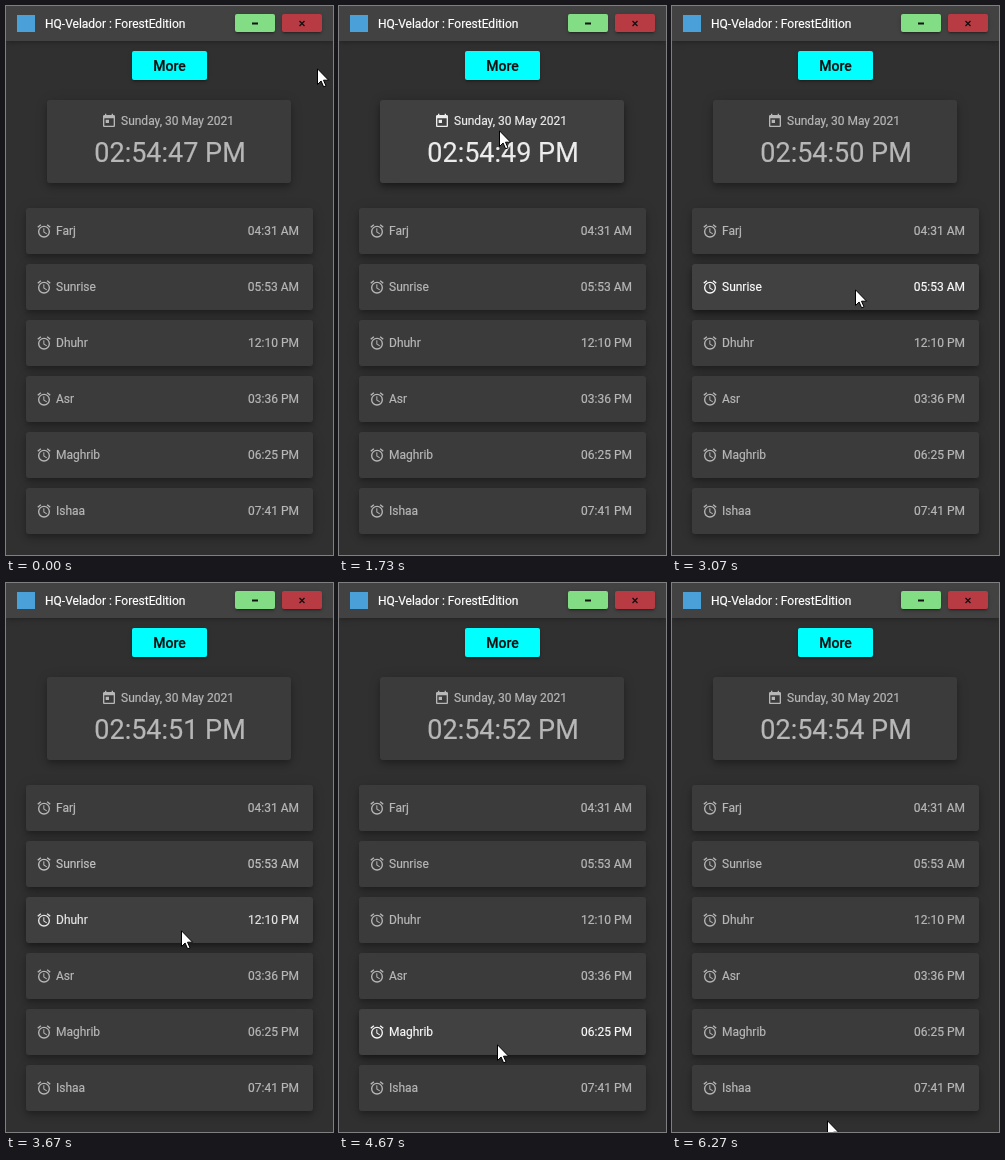
An HTML page for the animation above (6470 ms loop, 327x549 px).

```html
<!DOCTYPE html>
<html lang="en">
<head>
<meta charset="utf-8">
<title>Daily times</title>
<style>
html, body { margin: 0; width: 100%; height: 100%; overflow: hidden; background: #303030; }
body {
  position: relative; color: #fff; font: 12px Roboto, sans-serif; cursor: default;
  -webkit-text-stroke: .2px;
}
body *, svg { position: absolute; box-sizing: border-box; white-space: nowrap; }
header, .card {
  background: #424242;
  box-shadow: 0 3px 5px -1px rgba(0,0,0,.3), 0 5px 8px rgba(0,0,0,.24), 0 1px 14px rgba(0,0,0,.2);
}
header {
  left: 0; top: 0; width: 327px; height: 35px; line-height: 37px;
  box-shadow: 0 2px 4px -1px rgba(0,0,0,.2), 0 1px 8px rgba(0,0,0,.14);
}
header b, .more {
  border-radius: 2px;
  box-shadow: 0 3px 1px -2px rgba(0,0,0,.2), 0 2px 2px rgba(0,0,0,.14), 0 1px 5px rgba(0,0,0,.12);
}
header b { top: 8px; width: 40px; height: 18px; }
header svg { left: 0; top: 0; }
.logo { left: 11px; top: 9px; width: 18px; height: 17px; background: #4aa0d8; }
.more {
  left: 126px; top: 45px; width: 75px; height: 29px;
  background: #0ff; color: #111; font-size: 14px; font-weight: 500; line-height: 30px; text-align: center;
}
.card { border-radius: 3px; opacity: .65; }
.clock { left: 41px; top: 94px; width: 244px; height: 83px; }
.date { left: 74px; top: 11px; line-height: 20px; }
.time { left: 1px; top: 38px; width: 244px; font-size: 27px; line-height: 30px; text-align: center; }
.row { left: 20px; width: 287px; height: 46px; line-height: 46px; }
.name { left: 30px; }
.hour { right: 14px; }
.icon { width: 16px; height: 16px; fill: #fff; }
.row .icon { left: 10px; top: 15px; }
.clock .icon { left: 54px; top: 13px; }
#pointer { left: 0; top: 0; width: 14px; height: 21px; }
</style>
</head>
<body>
<header>
  <i class="logo"></i>
  <span style="left:39px">HQ-Velador : ForestEdition</span>
  <b style="left:229px;background:#82dd85"></b>
  <b style="left:276px;background:#b83a43"></b>
  <svg width="327" height="35" fill="none" stroke="#111">
    <path d="M246 17.5h6" stroke-width="2"/>
    <path d="M293.5 15l5 5m0-5l-5 5" stroke-width="1.3"/>
  </svg>
</header>
<div class="more">More</div>
<div class="card clock">
  <svg class="icon" viewBox="0 0 24 24"><path d="M19 3h-1V1h-2v2H8V1H6v2H5c-1.1 0-2 .9-2 2v14c0 1.1.9 2 2 2h14c1.1 0 2-.9 2-2V5c0-1.1-.9-2-2-2zm0 16H5V8h14zM7 10h5v5H7z"/></svg>
  <span class="date">Sunday, 30 May 2021</span>
  <span class="time"></span>
</div>
<svg id="pointer"><path d="M.5.8V16.5L4.1 13 6.6 18.8 9 17.8 6.5 12.2H11.6Z" fill="#fff" stroke="#000"/></svg>
<script>
const LOOP = 6470, FADE = 500, DIM = .65;
const ROWS = {
  Farj: '04:31 AM', Sunrise: '05:53 AM', Dhuhr: '12:10 PM',
  Asr: '03:36 PM', Maghrib: '06:25 PM', Ishaa: '07:41 PM'
};

// Key points of the pointer: time, x, y
const PATH = [
  [0, 311, 62], [330, 279, 57], [730, 279, 57], [1070, 158, 72], [1330, 158, 72],
  [1730, 160, 124], [1930, 172, 180], [2200, 177, 222], [2600, 181, 235], [2800, 183, 272],
  [3070, 183, 283], [3270, 183, 283], [3900, 170, 384], [4200, 162, 408], [5130, 155, 512],
  [5470, 155, 537], [LOOP, 155, 537]
];

const ALARM = 'M22 5.7l-4.6-3.8-1.3 1.5 4.6 3.8zM7.9 3.4L6.6 1.9 2 5.7l1.3 1.5zM12.5 8H11v6l4.75 2.85.75-1.23-4-2.37z' +
  'M12 4a9 9 0 1 0 0 18a9 9 0 1 0 0-18zm0 16a7 7 0 1 1 0-14a7 7 0 1 1 0 14z';
const pointer = document.getElementById('pointer');
const clock = document.querySelector('.time');

Object.entries(ROWS).forEach(([name, hour], i) => {
  const row = document.createElement('div');
  row.className = 'card row';
  row.style.top = 202 + 56 * i + 'px';
  row.innerHTML = `<svg class="icon" viewBox="0 0 24 24"><path d="${ALARM}"/></svg>
    <span class="name">${name}</span><span class="hour">${hour}</span>`;
  pointer.before(row);
});

function pointerAt(t) {
  const i = Math.max(1, PATH.findIndex(p => p[0] >= t));
  const [t0, x0, y0] = PATH[i - 1], [t1, x1, y1] = PATH[i];
  const k = (t - t0) / (t1 - t0);
  return [Math.round(x0 + (x1 - x0) * k), Math.round(y0 + (y1 - y0) * k)];
}

// The path crosses each card once; find when it goes in and out.
function crossing(el) {
  const top = el.offsetTop, bottom = top + el.offsetHeight;
  const timeAt = edge => {
    let t = 0;
    while (t < LOOP && pointerAt(t)[1] < edge) t += 10;
    return t;
  };
  return { el, enter: timeAt(top), leave: timeAt(bottom) };
}
const cards = [...document.querySelectorAll('.card')].map(crossing);

function ease(x) {
  const p = 1 - Math.pow(1 - Math.min(1, Math.max(0, x)), 1.8);
  return p * p * (3 - 2 * p);
}

// The picture advances at 15 steps per second, on a 10 ms clock.
function stepped(t) {
  const rest = t % 200;
  return t - rest + (rest >= 130 ? 130 : rest >= 70 ? 70 : 0);
}

function draw(now) {
  const t = stepped(now % LOOP);
  const [x, y] = pointerAt(t);
  pointer.style.transform = `translate(${x}px,${y}px)`;
  clock.textContent = `02:54:${47 + Math.floor((t + 655) / 985)} PM`;
  for (const { el, enter, leave } of cards) {
    const glow = ease((t - enter) / FADE) * (1 - ease((t - leave) / FADE));
    el.style.opacity = DIM + (1 - DIM) * glow;
  }
}

const start = performance.now();
function frame() {
  draw(performance.now() - start);
  requestAnimationFrame(frame);
}
frame();
</script>
</body>
</html>
```
